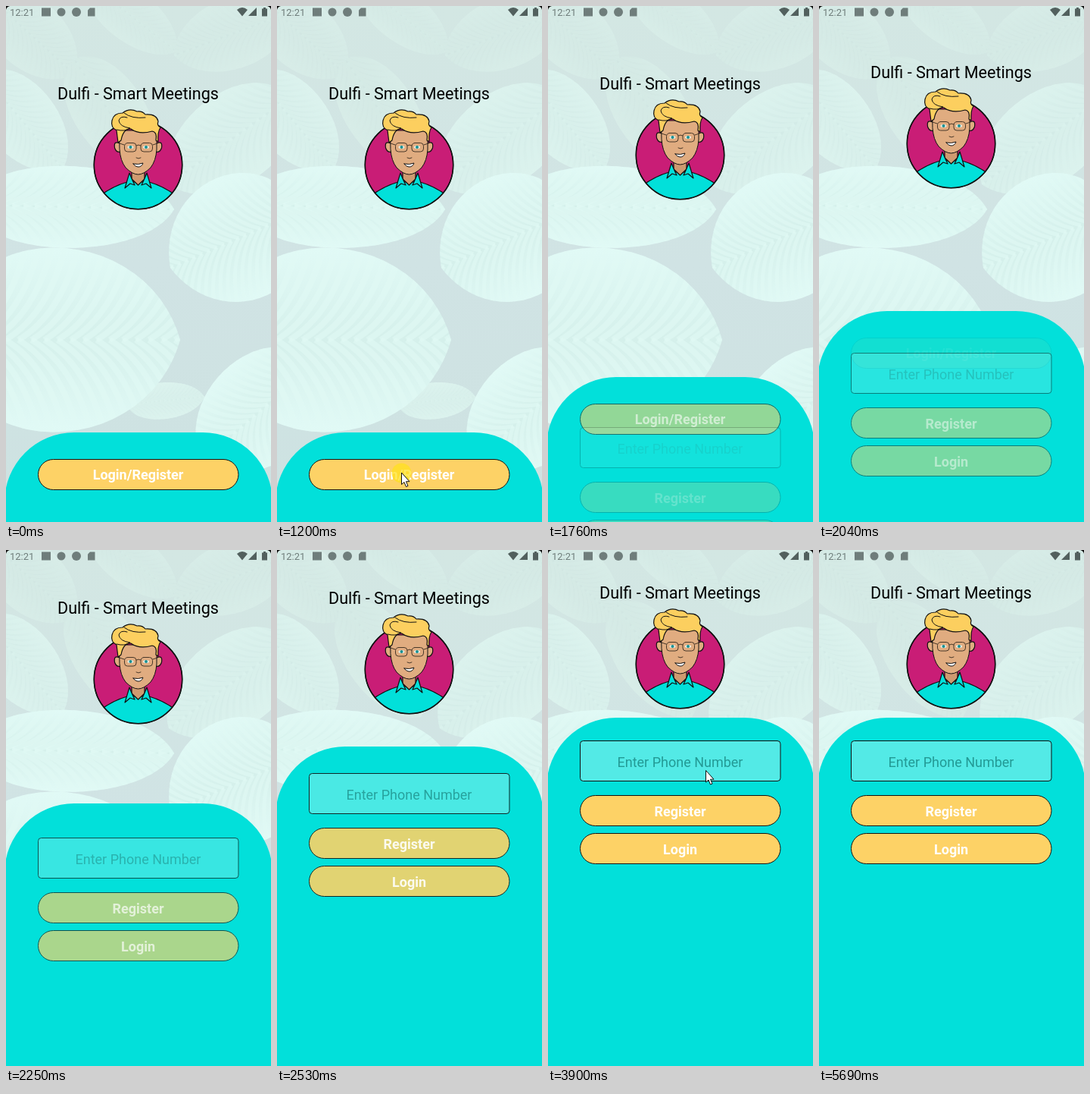
Animation of 350 by 680 pixels, one loop 6480 ms. Source, as an HTML page with a canvas:

```html
<!DOCTYPE html>
<html lang="en">
<head>
<meta charset="utf-8">
<title>Smart Meetings</title>
<style>
  html, body { margin: 0; width: 100%; height: 100%; overflow: hidden; background: #d3e5e4; }
  canvas, svg { position: absolute; left: 0; top: 0; width: 350px; height: 680px; }
  text { font: 18px Roboto, sans-serif; text-anchor: middle; }
  .title { font-size: 21.6px; }
  .btn rect, .field rect { stroke: #111; }
  .btn rect { fill: #fdd266; }
  .btn text { font-weight: 700; fill: #fff; }
  .field rect { fill: #fff; fill-opacity: .32; }
  .field text { fill: #239a95; }
  .fade rect, .fade text { opacity: var(--alpha); }
  .clock { font-size: 13px; text-anchor: start; }
  .line { fill: none; }
  .avatar { stroke: #111; stroke-width: 1.2; stroke-linejoin: round; stroke-linecap: round; }
</style>
</head>
<body>
<canvas id="leaves" width="350" height="680"></canvas>
<svg viewBox="0 0 350 680">
  <defs>
    <clipPath id="disc"><circle cx="174.5" cy="209.5" r="58.2"/></clipPath>
  </defs>

  <path d="M0 0H5Q1 1 0 5ZM350 0H345Q349 1 350 5Z" fill="#111"/>
  <g fill="#6f7d7b">
    <text class="clock" x="5" y="13">12:21</text>
    <rect x="47" y="2.500" width="12" height="11"/>
    <circle cx="73" cy="8" r="5.500"/>
    <circle cx="93" cy="8" r="6"/>
    <path d="M111 2.500h6.500v11h-9.500v-8z"/>
    <path d="M305 5q7-6 14 0l-7 8.500zM331 2v11h-11zM338 3.500h2v-1.500h3v1.500h2v10h-7z" fill="#52605e"/>
  </g>

  <g id="head">
    <text class="title" x="174.5" y="122.500">Dulfi - Smart Meetings</text>
    <g class="avatar">
      <circle cx="174.500" cy="209.500" r="58.200" fill="#c91d76"/>
      <g clip-path="url(#disc)">
        <path d="M124 250Q142 237 160 232H189Q207 237 225 250V275H124Z" fill="#02e0da"/>
      </g>
      <circle class="line" cx="174.500" cy="209.500" r="58.200" stroke-width="1.600"/>
      <path d="M166 212V228L174.500 236L183 228V212Z" fill="#cf9a70"/>
      <path d="M163 220L157 240L164 234L170 236Q166 228 163 220ZM186 220L192 240L185 234L179 236Q183 228 186 220Z" fill="#02e0da"/>
      <path d="M150 181Q142 177 143.500 187Q146 194 152 192M199 181Q207 177 205.500 187Q203 194 197 192" fill="#e0ac80"/>
      <path d="M150 164H199V189Q198 204 191 213Q182 222 174.500 222Q167 222 158 213Q151 204 150 189Z" fill="#e0ac80" stroke-width="1"/>
      <path d="M148 180L146 164Q138 160 140 151Q142 141 154 141Q163 134 173 139Q180 138 184 143Q199 142 201 152Q199 158 204 160Q200 166 201 179L198 177Q200 166 193 165Q176 170 165 162Q155 161 152 177Z" fill="#fccf5f"/>
      <path class="line" d="M146 163Q157 166 164 161Q150 159 149 151Q151 144 160 147M156 141Q166 149 184 147" stroke-width="1"/>
      <g stroke="none">
        <ellipse cx="164.500" cy="186" rx="4" ry="2" fill="#e5efe9"/>
        <ellipse cx="185" cy="186" rx="4" ry="2" fill="#e5efe9"/>
        <circle cx="164.500" cy="186" r="2" fill="#178f91"/>
        <circle cx="185" cy="186" r="2" fill="#178f91"/>
      </g>
      <g class="line" stroke="#493829" stroke-width="1">
        <rect x="156.500" y="180.500" width="15.500" height="11.500" rx="4"/>
        <rect x="178" y="180.500" width="15.500" height="11.500" rx="4"/>
        <path d="M172 184Q175 182 178 184M156 183L150 181M194 183L200 181M172 200Q175 202 178 200"/>
      </g>
      <path d="M168 208Q175 209.500 181 207Q179 212.500 174 212Q170 211.500 168 208Z" fill="#fff" stroke-width="1"/>
    </g>
  </g>

  <rect id="panel" x="-2" y="562" width="354" height="700" rx="92" fill="#02e0da"/>

  <g id="start" class="btn fade">
    <rect x="42.500" y="597.500" width="264.500" height="40" rx="20"/>
    <text x="174.500" y="624">Login/Register</text>
  </g>

  <g id="form" class="fade">
    <g class="field">
      <rect x="42.500" y="638.500" width="264.500" height="53" rx="4"/>
      <text x="174.500" y="672.500">Enter Phone Number</text>
    </g>
    <g class="btn">
      <rect x="42.500" y="710.500" width="264.500" height="40" rx="20"/>
      <text x="174.500" y="738">Register</text>
    </g>
    <g class="btn">
      <rect x="42.500" y="760.500" width="264.500" height="40" rx="20"/>
      <text x="174.500" y="788">Login</text>
    </g>
  </g>

  <circle id="tap" cx="164.500" cy="615.500" r="13" fill="#ffe11c" opacity=".72"/>
  <path id="cursor" d="M.5.5V16L4 13L6.500 19L9 18L6.500 12.200H11Z" fill="#fff" stroke="#111"/>
</svg>

<script>
const LOOP = 6480, STEP = 70, CLICK = 1200, MOVE = 1265, SPAN = 1615;
const byId = id => document.getElementById(id);
const [head, panel, start, form, tap, cursor] =
  ['head', 'panel', 'start', 'form', 'tap', 'cursor'].map(byId);

// Cursor stops: time, x, y; no position means hidden
const stops = [
  [0], [460, 210, 664], [530, 188, 640], [660, 170, 621], [730, 164, 614.5], [1340],
  [2740, 228, 460], [2810, 222, 380], [2880, 222, 315], [2950, 222, 273], [3020, 221, 262],
  [3220, 220, 263], [3290, 219, 265], [3490, 219, 267], [3560, 218, 269],
  [3760, 216, 275], [3830, 211, 284], [3900, 208, 290], [5620, 243, 394], [5690]
];

const shift = (el, x, y) => el.setAttribute('transform', `translate(${x} ${y})`);
const rise = (el, distance) => shift(el, 0, -Math.round(distance));
const fade = (el, alpha) => el.style.setProperty('--alpha', alpha);
const show = (el, on) => el.setAttribute('visibility', on ? 'visible' : 'hidden');

function render(t) {
  const held = CLICK + Math.floor((t - CLICK) / STEP) * STEP;
  const u = Math.min(1, Math.max(0, (held - MOVE) / SPAN));
  const p = (1 - Math.cos(Math.PI * u)) / 2;

  rise(head, 59 * p);
  rise(panel, 341 * p);
  rise(start, 341 * p);
  rise(form, 387 * p);
  fade(start, Math.max(0, 1 - 2 * p));
  fade(form, p);
  show(tap, t >= CLICK && t < CLICK + 2 * STEP);

  const [, x, y] = stops.findLast(s => s[0] <= t);
  show(cursor, x !== undefined);
  if (x !== undefined) shift(cursor, x, y);
}

const ctx = byId('leaves').getContext('2d');

// A soft leaf from its stem to its tip, with curved veins on both sides
function leaf(x, y, tipX, tipY, w, dark, light) {
  const len = Math.hypot(tipX - x, tipY - y);
  const fill = ctx.createLinearGradient(0, -w * .75, 0, w * .75);
  fill.addColorStop(0, light);
  fill.addColorStop(.5, dark);
  fill.addColorStop(1, light);

  ctx.save();
  ctx.translate(x, y);
  ctx.rotate(Math.atan2(tipY - y, tipX - x));
  ctx.beginPath();
  ctx.moveTo(0, 0);
  ctx.bezierCurveTo(len * .05, -w, len * .85, -w, len, 0);
  ctx.bezierCurveTo(len * .85, w, len * .05, w, 0, 0);
  ctx.fillStyle = fill;
  ctx.fill();
  ctx.clip();
  ctx.strokeStyle = light;
  ctx.globalAlpha = .6;
  ctx.lineWidth = len / 40;
  for (let a = -len * .3; a < len; a += len / 18) {
    for (const side of [-1, 1]) {
      ctx.beginPath();
      ctx.moveTo(a, 0);
      ctx.quadraticCurveTo(a + len * .22, side * w * .25, a + len * .28, side * w);
      ctx.stroke();
    }
  }
  ctx.restore();
}

function paintLeaves() {
  const base = ctx.createLinearGradient(0, 0, 0, 680);
  base.addColorStop(0, '#d3e7e3');
  base.addColorStop(.5, '#d0e3e4');
  base.addColorStop(1, '#cde2e1');
  ctx.fillStyle = base;
  ctx.fillRect(0, 0, 350, 680);

  const dim = ['#d1e6e2', '#d8ede8'], mid = ['#d3ebe7', '#dcf3ee'], lit = ['#d5f0eb', '#e1faf6'];
  leaf(110, -30, 225, 60, 45, ...dim);
  leaf(370, 10, 222, 65, 62, ...dim);
  leaf(-20, -10, 90, 90, 60, ...dim);
  leaf(-30, 90, 75, 215, 62, ...mid);
  leaf(90, 70, 190, 220, 62, ...dim);
  leaf(375, 120, 215, 235, 80, ...mid);
  leaf(-45, 262, 222, 268, 72, ...lit);
  leaf(390, 270, 217, 345, 112, ...lit);
  leaf(160, 525, 262, 515, 32, ...mid);
  leaf(410, 470, 258, 600, 95, ...lit);
  leaf(-80, 440, 230, 440, 162, ...lit);
}

function tick(now) {
  render(now % LOOP);
  requestAnimationFrame(tick);
}

paintLeaves();
render(0);
requestAnimationFrame(tick);
</script>
</body>
</html>
```
